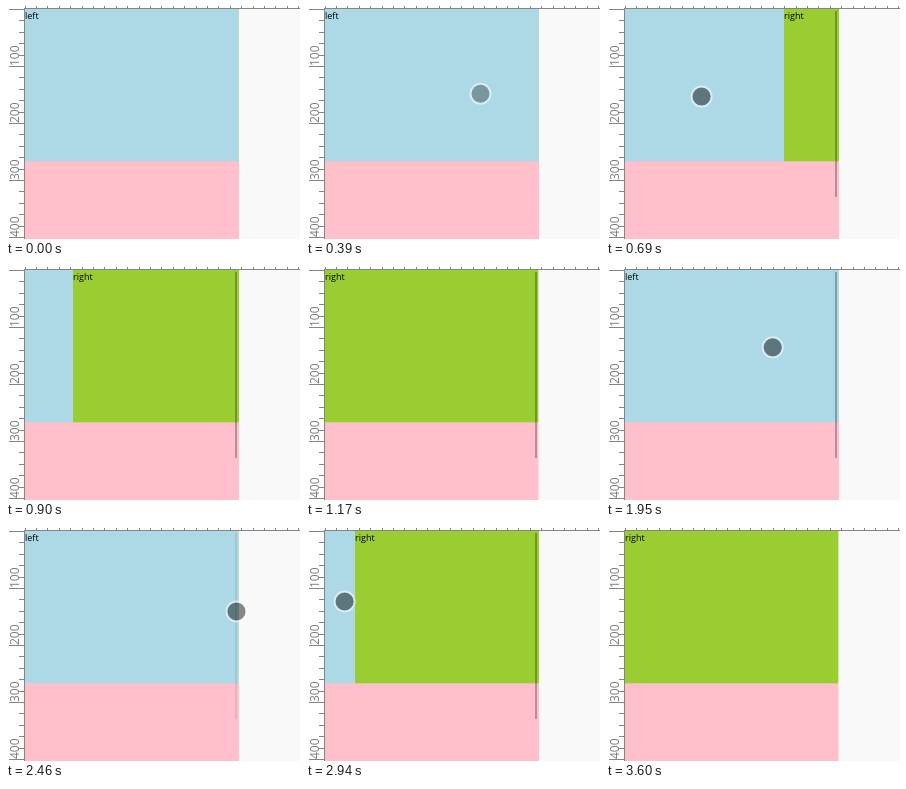
An HTML page with a canvas that plays this animation: 294x233 px, repeating every 4170 ms.

```html
<!DOCTYPE html>
<html lang="en">
<head>
<meta charset="utf-8">
<title>Swipe panels</title>
<style>
  html, body { margin: 0; width: 100%; height: 100%; overflow: hidden; background: #f9f9f9; }
  canvas { display: block; }
</style>
</head>
<body>
<canvas id="stage" width="294" height="233"></canvas>
<script>
const ctx = document.getElementById('stage').getContext('2d');
const LOOP = 4170, STEP = 30;
const LEFT = 19, TOP = 3, RIGHT = 233, SPLIT = 155;
const REST = 232.75;
const UNIT = 57;

// Each move eases out; grip is the distance from the finger to the panel seam.
const moves = [
  { name: 'enter',  start: 60,   end: 210,  from: [286, 42],   to: [166.5, 82.5], power: 1.5,  grip: Infinity },
  { name: 'press',  start: 330,  end: 450,  from: [166.5, 82.5], to: [182.5, 93], power: 1,    grip: Infinity },
  { name: 'drag',   start: 570,  end: 1110, from: [182.5, 93], to: [-64, 86],     power: 1.73, grip: 82.5 },
  { name: 'return', start: 1500, end: 2040, from: [-72, 74],   to: [191, 81],     power: 1.33, grip: 91.4 },
  { name: 'drift',  start: 2040, end: 2580, from: [191, 81],   to: [239, 84],     power: 1.15, grip: 91.4 },
  { name: 'drag',   start: 2670, end: 3090, from: [239, 84],   to: [6, 71.8],     power: 1.91, grip: 10.5 },
  { name: 'leave',  start: 3300, end: 3390, from: [6, 71.8],   to: [-9, 61],      power: 1,    grip: 10.5 }
];

const clamp = (v, lo, hi) => Math.min(hi, Math.max(lo, v));
const mix = (a, b, k) => a + (b - a) * k;

function touchAt(t) {
  const move = moves.findLast(m => t >= m.start) || moves[0];
  const u = clamp((t - move.start) / (move.end - move.start), 0, 1);
  const k = 1 - (1 - u) ** move.power;
  const x = mix(move.from[0], move.to[0], k);
  return { x, y: mix(move.from[1], move.to[1], k), seam: clamp(x + move.grip, LEFT, REST) };
}

// The scrollbar shows while swiping, then fades.
function barOpacity(t) {
  const fade = (shown, hidden) => t < shown ? 0 : clamp((hidden - t) / 210, 0, 1);
  return Math.max(t < 2520 ? fade(630, 2520) : 0, fade(2730, 3600));
}

function rect(color, x, y, w, h) {
  ctx.fillStyle = color;
  ctx.fillRect(x, y, w, h);
}

function drawRulers() {
  const ink = '#858585';
  rect('#fff', 0, 0, 294, TOP);
  rect('#fff', 0, 0, LEFT, 233);
  rect(ink, LEFT - 1, 2, 276, 1);
  rect(ink, LEFT - 1, 2, 1, 231);
  for (let i = 0; i < 26; i++) {
    const pos = i * UNIT / 5;
    const length = i % 5 ? 5 : 15;
    rect(ink, Math.round(LEFT - 0.5 + pos), 0, 1, 2);
    rect(ink, LEFT - 1 - length, Math.round(TOP + pos), length, 1);
  }
  ctx.font = '12px "Open Sans", sans-serif';
  ctx.fillStyle = '#7c7c7c';
  for (let n = 1; n <= 4; n++) {
    ctx.save();
    ctx.translate(13, TOP + n * UNIT);
    ctx.rotate(-Math.PI / 2);
    ctx.fillText(n * 100, 0, 0);
    ctx.restore();
  }
}

function drawPage(seam) {
  const edge = seam === LEFT ? RIGHT - 0.6 : RIGHT;
  const x = seam === REST ? seam : Math.round(seam);
  const height = SPLIT + 0.3 - TOP;
  ctx.save();
  ctx.beginPath();
  ctx.rect(LEFT, TOP, RIGHT - LEFT, 233 - TOP);
  ctx.clip();
  rect('#ffc0cb', LEFT, SPLIT, edge - LEFT, 233 - SPLIT);
  if (seam < REST) rect('#9acd32', x, TOP, edge - x, height);
  else rect('rgba(154,205,50,.5)', Math.floor(x), TOP, 1, height);
  rect('#add8e6', LEFT, TOP, x - LEFT, height);
  ctx.font = '9px "Open Sans", sans-serif';
  ctx.fillStyle = '#000';
  ctx.fillText('left', x - REST + LEFT, 13);
  if (seam < REST) ctx.fillText('right', x, 13);
  ctx.restore();
}

function drawTouch(x, y, pressed) {
  ctx.beginPath();
  ctx.arc(x, y, 9.3, 0, Math.PI * 2);
  ctx.fillStyle = pressed ? 'rgba(0,0,0,.46)' : 'rgba(0,0,0,.3)';
  ctx.fill();
  ctx.beginPath();
  ctx.arc(x, y, 10, 0, Math.PI * 2);
  ctx.lineWidth = 2;
  ctx.strokeStyle = 'rgba(255,255,255,.55)';
  ctx.stroke();
}

function draw(now) {
  const t = Math.floor(now % LOOP / STEP) * STEP;
  const { x, y, seam } = touchAt(t);
  rect('#f9f9f9', 0, 0, 294, 233);
  drawRulers();
  drawPage(t < moves[0].start ? REST : seam);
  rect(`rgba(0,0,0,${0.27 * barOpacity(t)})`, 229, 5, 2, 186);
  if (t >= 60 && t < 3390) drawTouch(x, y, t >= 450);
}

const start = performance.now();
function tick() {
  draw(performance.now() - start);
  requestAnimationFrame(tick);
}
tick();
</script>
</body>
</html>
```
